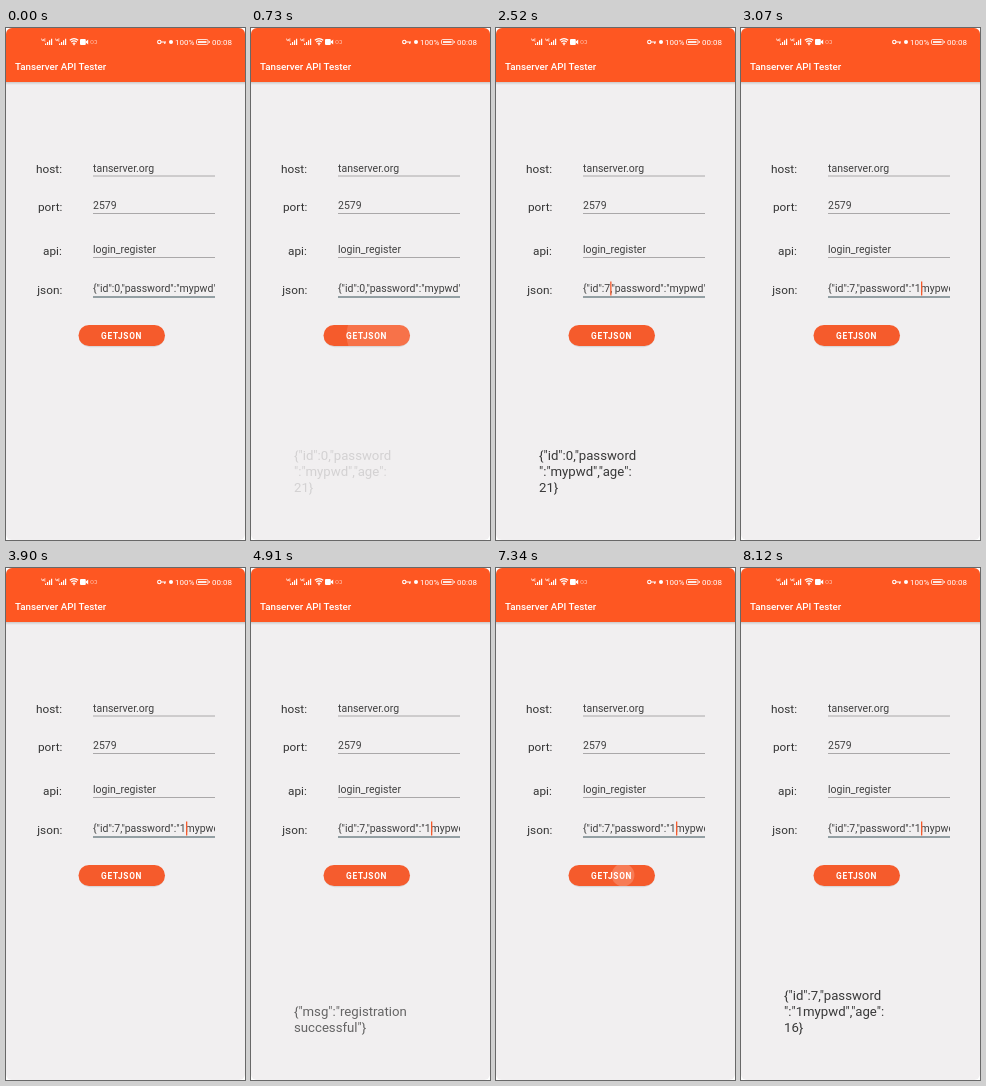
Recreate the animation shown at these times as an HTML page. Size 239 px wide and 512 px high, loop 8.17 s.

```html
<!DOCTYPE html>
<html lang="en">
<head>
<meta charset="utf-8">
<title>Tanserver API Tester</title>
<style>
  html, body { margin: 0; width: 100%; height: 100%; overflow: hidden; background: #fff; }
  svg { display: block; width: 100vw; height: 100vh; font-family: Roboto, sans-serif; }
  text { white-space: pre; }
  .status { font-size: 8px; fill: #fff; }
  .title { font-size: 9.8px; font-weight: 500; fill: #fff; }
  .label { font-size: 11.8px; fill: #333; }
  .field { font-size: 10.5px; fill: #404040; }
  .reply { font-size: 13.2px; fill: #383838; }
  .button { font-size: 8.3px; font-weight: 700; letter-spacing: .75px; fill: #fff; }
  .line { stroke: #aaa8a9; stroke-width: 1; }
</style>
</head>
<body>
<svg viewBox="0 0 239 512">
  <defs>
    <clipPath id="screenClip"><rect width="239" height="512" rx="6"/></clipPath>
    <clipPath id="fieldClip"><rect x="86" y="250" width="123" height="22"/></clipPath>
    <clipPath id="buttonClip"><rect x="72.5" y="297" width="86.5" height="21" rx="10.5"/></clipPath>
    <linearGradient id="shade" x2="0" y2="1">
      <stop stop-color="#000" stop-opacity=".16"/>
      <stop offset="1" stop-color="#000" stop-opacity="0"/>
    </linearGradient>
    <g id="signal" fill="#fff">
      <path d="M0 11h1v1.6h1.4V11M3 11h1.6M3 11v2h1.6" fill="none" stroke="#fff" stroke-width=".6"/>
      <path d="M4 15.5h1.2V17H4zM6 14h1.2v3H6zM8 12.3h1.2V17H8zM10 10.7h1.2V17H10z"/>
    </g>
  </defs>
  <g clip-path="url(#screenClip)">
    <rect width="239" height="512" fill="#f1eff0"/>
    <rect y="54" width="239" height="3" fill="url(#shade)"/>
    <rect width="239" height="54" fill="#fe5722"/>

    <use href="#signal" x="35"/>
    <use href="#signal" x="49"/>
    <g fill="none" stroke="#fff" stroke-width="1.1">
      <path d="M63.8 12.3q4.2-3.4 8.4 0M65.2 14q2.8-2.2 5.6 0M66.6 15.6q1.4-1 2.8 0"/>
      <circle cx="153.3" cy="14" r="1.7"/>
      <path d="M155 14h5M158.8 14v2"/>
    </g>
    <g fill="#fff">
      <circle cx="68" cy="16.6" r=".8"/>
      <rect x="74" y="11" width="5.8" height="6" rx="1"/>
      <path d="M79.8 13.5l2.4-2v5l-2.4-2z"/>
      <circle cx="165" cy="14" r="2"/>
    </g>
    <g fill="none" stroke="#fff" opacity=".5" stroke-width=".8">
      <rect x="84.5" y="12.5" width="3" height="3" rx="1.2"/>
      <path d="M88.5 12.5h2v3h-2"/>
    </g>
    <text class="status" x="169" y="17">100%</text>
    <rect x="190.5" y="11.5" width="11.5" height="5" rx="1.2" fill="none" stroke="#fff" stroke-width=".8"/>
    <path d="M192 13h8.5v2H192zM202.8 13h1v2h-1z" fill="#fff" opacity=".85"/>
    <text class="status" x="206" y="17">00:08</text>
    <text class="title" x="9" y="42">Tanserver API Tester</text>

    <g id="form"></g>
    <path d="M87 269H209" stroke="#74848a" stroke-width="1.5"/>
    <g clip-path="url(#fieldClip)">
      <text class="field" id="json" x="87" y="264"></text>
    </g>
    <rect id="cursor" y="253.5" width="1.3" height="14" fill="#f4592c"/>

    <rect x="73" y="298.2" width="85.5" height="21" rx="10.5" fill="#000" opacity=".1"/>
    <rect x="72.5" y="297" width="86.5" height="21" rx="10.5" fill="#f55b2c"/>
    <g clip-path="url(#buttonClip)"><circle id="ripple" cx="127" cy="307" fill="#fff"/></g>
    <text class="button" x="95" y="310.6">GETJSON</text>

    <g id="reply"></g>
  </g>
</svg>
<script>
const LOOP = 8170;
const $ = id => document.getElementById(id);
const clamp = v => Math.max(0, Math.min(1, v));

const rows = [
  ['host:', 30, 144.5, 'tanserver.org', 143.5],
  ['port:', 32, 182.5, '2579', 181],
  ['api:', 37, 227, 'login_register', 225],
  ['json:', 31.3, 265.5]
];
$('form').innerHTML = rows.map(([label, x, y, value, base]) =>
  `<text class="label" x="${x}" y="${y}">${label}</text>` + (value
    ? `<text class="field" x="87" y="${base}">${value}</text>
       <path class="line" d="M87 ${base + 4.5}H209"/>` : '')).join('');

// [time, id, text typed before the password, caret x]
const edits = [
  [0, '0', '', 114.2],
  [1650, '', '', 108.3],
  [1900, '7', '', 114.2],
  [2660, '7', '', 174.2],
  [2800, '7', '1', 180]
];
const caretOn = [[1420, 1930], [2430, 3300], [3810, 4310], [4810, 5320],
                 [5830, 6280], [6830, 7390], [7800, LOOP]];
const presses = [460, 4500, 7200];

const replies = [
  [700, 2750, 432, ['{"id":0,"password', '":"mypwd","age":', '21}']],
  [4760, 6830, 448, ['{"msg":"registration', 'successful"}']],
  [7400, 9999, 432, ['{"id":7,"password', '":"1mypwd","age":', '16}']]
];
$('reply').innerHTML = replies.map(([, , y, lines]) =>
  '<g>' + lines.map((s, i) =>
    `<text class="reply" x="43" y="${y + i * 15.8}">${s}</text>`).join('') + '</g>').join('');
const replyGroups = [...$('reply').children];

function render(t) {
  const [, id, prefix, caretX] = edits.filter(e => e[0] <= t).pop();
  const json = `{"id":${id},"password":"${prefix}mypwd","age":${prefix ? 16 : 21}}`;
  if ($('json').textContent !== json) $('json').textContent = json;
  $('cursor').setAttribute('x', caretX);
  $('cursor').setAttribute('opacity', +caretOn.some(([a, b]) => t >= a && t < b));

  const press = presses.filter(p => p <= t).pop();
  const age = press === undefined ? 999 : t - press;
  $('ripple').setAttribute('r', 4 + 60 * clamp(age / 400) ** 2);
  $('ripple').setAttribute('opacity', .2 * clamp(age / 60) * clamp((420 - age) / 220));

  replies.forEach(([start, end], i) => replyGroups[i].setAttribute('opacity',
    clamp((t - start) / 200) * clamp(1 - (t - end) / 200)));
}

const began = performance.now();
function tick() {
  render((performance.now() - began) % LOOP);
  requestAnimationFrame(tick);
}
tick();
</script>
</body>
</html>
```
